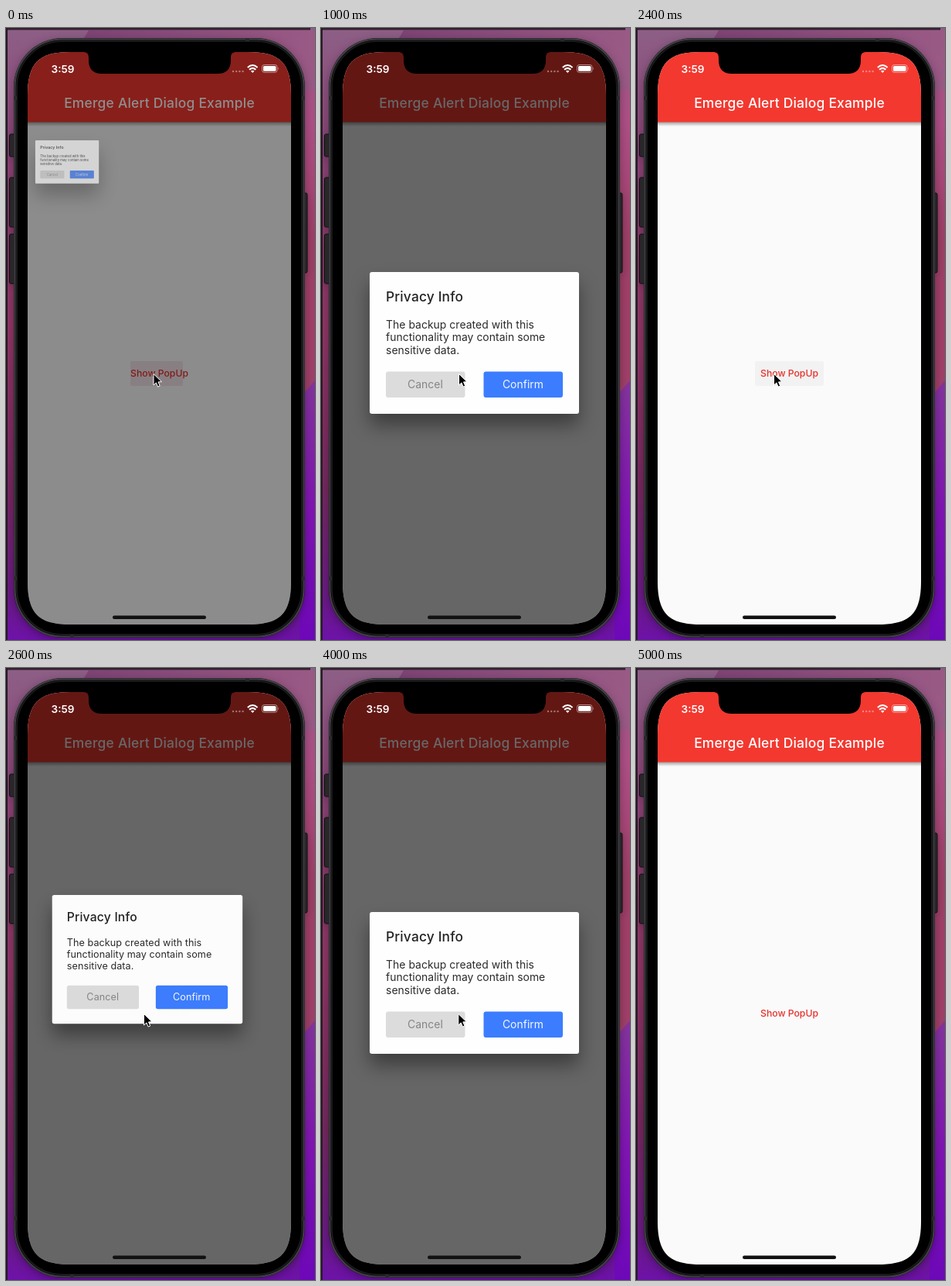
An HTML page that plays this animation: 400x790 px, repeating every 6000 ms.

```html
<!DOCTYPE html>
<html lang="en">
<head>
<meta charset="utf-8">
<title>Alert dialog demo</title>
<style>
  html, body { margin: 0; width: 100%; height: 100%; overflow: hidden; background: #000; }
  svg { display: block; width: 100%; height: 100%; font-family: Inter, "Open Sans", sans-serif; }
  .mid { text-anchor: middle; }
  .medium { font-weight: 500; }
  .heading { letter-spacing: .2px; }
  .body { font-size: 13.9px; letter-spacing: .05px; }
  #phone { filter: drop-shadow(0 3px 6px rgba(0, 0, 0, .3)); }
  #shadow { filter: drop-shadow(0 15px 12px rgba(0, 0, 0, .4)); }
</style>
</head>
<body>
<svg viewBox="0 0 400 790" preserveAspectRatio="none">
  <defs>
    <linearGradient id="wall" x1="0" y1="0" x2="0" y2="1">
      <stop offset="0" stop-color="#8d5f86"/>
      <stop offset=".2" stop-color="#8a4377"/>
      <stop offset=".5" stop-color="#8f3564"/>
      <stop offset=".75" stop-color="#75285f"/>
      <stop offset=".93" stop-color="#6a1a86"/>
      <stop offset="1" stop-color="#6d12a8"/>
    </linearGradient>
    <linearGradient id="wallTop">
      <stop offset="0" stop-color="#7a4072"/>
      <stop offset="1" stop-color="#9a5a86"/>
    </linearGradient>
    <linearGradient id="wallRight" x1="0" y1="0" x2="0" y2="1">
      <stop offset="0" stop-color="#9a5a86"/>
      <stop offset=".25" stop-color="#ae4f86"/>
      <stop offset=".58" stop-color="#a04069"/>
    </linearGradient>
    <linearGradient id="violet" x1="0" y1="0" x2="0" y2="1">
      <stop offset="0" stop-color="#84359c"/>
      <stop offset=".5" stop-color="#8115b4"/>
      <stop offset="1" stop-color="#6d08b8"/>
    </linearGradient>
    <linearGradient id="barShadow" x1="0" y1="0" x2="0" y2="1">
      <stop offset="0" stop-opacity=".38"/>
      <stop offset="1" stop-opacity="0"/>
    </linearGradient>
    <clipPath id="screen">
      <path d="M84 31H313C354.900 31 369 45.100 369 87V714C369 755.900 354.900 770 313 770H84C42.100 770 28 755.900 28 714V87C28 45.100 42.100 31 84 31Z"/>
    </clipPath>
    <clipPath id="cancelClip"><rect x="84" y="443.500" width="102.500" height="33.500" rx="3"/></clipPath>
  </defs>

  <!-- wallpaper and window edges -->
  <rect width="400" height="790" fill="url(#wall)"/>
  <rect x="380" y="3" width="20" height="470" fill="url(#wallRight)"/>
  <path d="M107 3H400V80H60Z" fill="url(#wallTop)"/>
  <path d="M400 455L380 478V790H400Z" fill="url(#violet)"/>
  <rect width="394" height="2.500" fill="#33202f"/>
  <rect width="2" height="790" fill="#251824"/>

  <g id="phone">
    <g fill="#29272a" stroke="#111" stroke-width="1">
      <rect x="4.500" y="137" width="8" height="29" rx="2"/>
      <rect x="4.500" y="193" width="8" height="64" rx="2"/>
      <rect x="4.500" y="266" width="8" height="64" rx="2"/>
      <rect x="383" y="213" width="7" height="103" rx="2"/>
    </g>
    <rect x="10" y="13" width="377" height="774" rx="63" fill="#1a191b"/>
    <rect x="11.500" y="14.500" width="374" height="771" rx="61.500" fill="#000" stroke="#414044" stroke-width="2"/>
    <rect x="14" y="17" width="369" height="766" rx="59" fill="none" stroke="#1a1a1c" stroke-width="2"/>
    <path d="M10 88h4v5h-4zM383 88h4v5h-4zM10 708h4v5h-4zM383 708h4v5h-4zM310 13h5v4h-5zM83 783h5v4h-5z" fill="#29292b"/>
  </g>

  <g clip-path="url(#screen)">
    <rect x="28" y="31" width="341" height="739" fill="#fafafa"/>
    <rect x="28" y="121" width="341" height="6" fill="url(#barShadow)"/>
    <rect x="28" y="31" width="341" height="90.500" fill="#f3382f"/>
    <text class="mid medium heading" x="198.500" y="103" font-size="17.450" fill="#fff">Emerge Alert Dialog Example</text>

    <rect id="hover" x="154" y="430" width="89" height="32" rx="2" fill="#f2f2f2"/>
    <rect id="splash" x="161" y="430" width="68" height="32" rx="2" fill="#c03a70" opacity=".12"/>
    <text class="mid medium" x="198.500" y="450" font-size="12.200" fill="#e5322c">Show PopUp</text>

    <rect id="scrim" x="28" y="31" width="341" height="739"/>

    <g id="dialog"><g id="shadow"><g id="card">
      <rect x="63" y="315" width="271" height="183" rx="3" fill="#fefefe"/>
      <text class="medium heading" x="84" y="352.500" font-size="17.300" fill="#222">Privacy Info</text>
      <g class="body" fill="#2a2a2a">
        <text x="84" y="388">The backup created with this</text>
        <text x="84" y="404.300">functionality may contain some</text>
        <text x="84" y="420.600">sensitive data.</text>
      </g>
      <rect x="84" y="443.500" width="102.500" height="33.500" rx="3" fill="#dcdcdc"/>
      <g clip-path="url(#cancelClip)"><circle id="ripple" cx="178" cy="450" fill="#000" opacity=".07"/></g>
      <rect x="210.500" y="443.500" width="102.500" height="33.500" rx="3" fill="#3c7dff"/>
      <g class="body mid">
        <text x="135" y="465" fill="#858585">Cancel</text>
        <text x="261.500" y="465" fill="#f4f7ff">Confirm</text>
      </g>
    </g></g></g>

    <!-- notch, status bar, home indicator -->
    <path d="M99 31C105 31 107 33 107 39V42C107 53 113 59 124 59H274C285 59 291 53 291 42V39C291 33 293 31 299 31Z"/>
    <text x="58.500" y="57.500" font-size="13.600" font-weight="600" fill="#fff">3:59</text>
    <g fill="#fff" opacity=".4">
      <circle cx="294" cy="56" r="1.200"/><circle cx="298.200" cy="56" r="1.200"/>
      <circle cx="302.400" cy="56" r="1.200"/><circle cx="306.600" cy="56" r="1.200"/>
    </g>
    <g fill="none" stroke="#fff" stroke-width="2">
      <path d="M312.800 51Q319.200 45 325.600 51"/>
      <path d="M315 53.700Q319.200 50 323.400 53.700"/>
    </g>
    <path d="M319.200 58L316.900 55.600Q319.200 53.700 321.500 55.600Z" fill="#fff"/>
    <rect x="331.500" y="47.500" width="19.500" height="9.800" rx="2.800" fill="none" stroke="#fff" stroke-opacity=".5"/>
    <rect x="333" y="49" width="16.500" height="6.800" rx="1.500" fill="#fff"/>
    <path d="M352 50.500q1.500 1.800 0 3.600z" fill="#fff" opacity=".6"/>
    <rect x="138" y="758.500" width="121" height="4.500" rx="2.250" fill="#111"/>
  </g>

  <path id="cursor" d="M0 0V14.500L3.400 11.400L5.600 16.600L8.200 15.500L6 10.400L10.500 10.200Z" fill="#000" stroke="#fff" stroke-width="1" stroke-linejoin="round"/>
</svg>
<script>
  const LOOP = 6000, STEP = 100, FADE = 200;
  const SCRIM = 0.592;
  // Start of each opening and closing, in ms
  const SHOWINGS = [
    { open: -92, close: 1050 },
    { open: 1400, close: 1692 },
    { open: 2412, close: 4550 },
  ];
  const part = id => document.getElementById(id);
  const [hover, splash, scrim, dialog, card, ripple, cursor] =
    ['hover', 'splash', 'scrim', 'dialog', 'card', 'ripple', 'cursor'].map(part);

  const clamp = v => Math.min(1, Math.max(0, v));
  const easeOut = (p, power) => 1 - (1 - p) ** power;
  const show = (el, on) => el.setAttribute('visibility', on ? 'visible' : 'hidden');

  function draw(t) {
    const showing = SHOWINGS.findLast(s => t >= s.open);
    const opened = clamp((t - showing.open) / FADE);
    const closed = clamp((t - showing.close) / FADE);
    const shown = opened * (1 - closed);
    const scale = opened ** 1.535;

    scrim.setAttribute('opacity', SCRIM * easeOut(shown, 2.25));
    dialog.setAttribute('opacity', easeOut(shown, 1.62));
    // The card grows out of the screen's upper left corner
    card.setAttribute('transform', `translate(27 71) scale(${scale}) translate(-27 -71)`);
    show(dialog, shown > 0);

    ripple.setAttribute('r', 76 * clamp((t - showing.close + 50) / 158));
    show(hover, shown === 0 && t < 5000);
    show(splash, opened < 0.6 && closed === 0);

    const x = t < 3000 ? 191 - 12.5 * clamp(t / 600) : 177.8;
    cursor.setAttribute('transform', `translate(${x} 446.500)`);
    show(cursor, t < 5000);
  }

  const start = performance.now();
  function frame() {
    const t = (performance.now() - start) % LOOP;
    draw(Math.floor(t / STEP) * STEP);
    requestAnimationFrame(frame);
  }
  frame();
</script>
</body>
</html>
```
